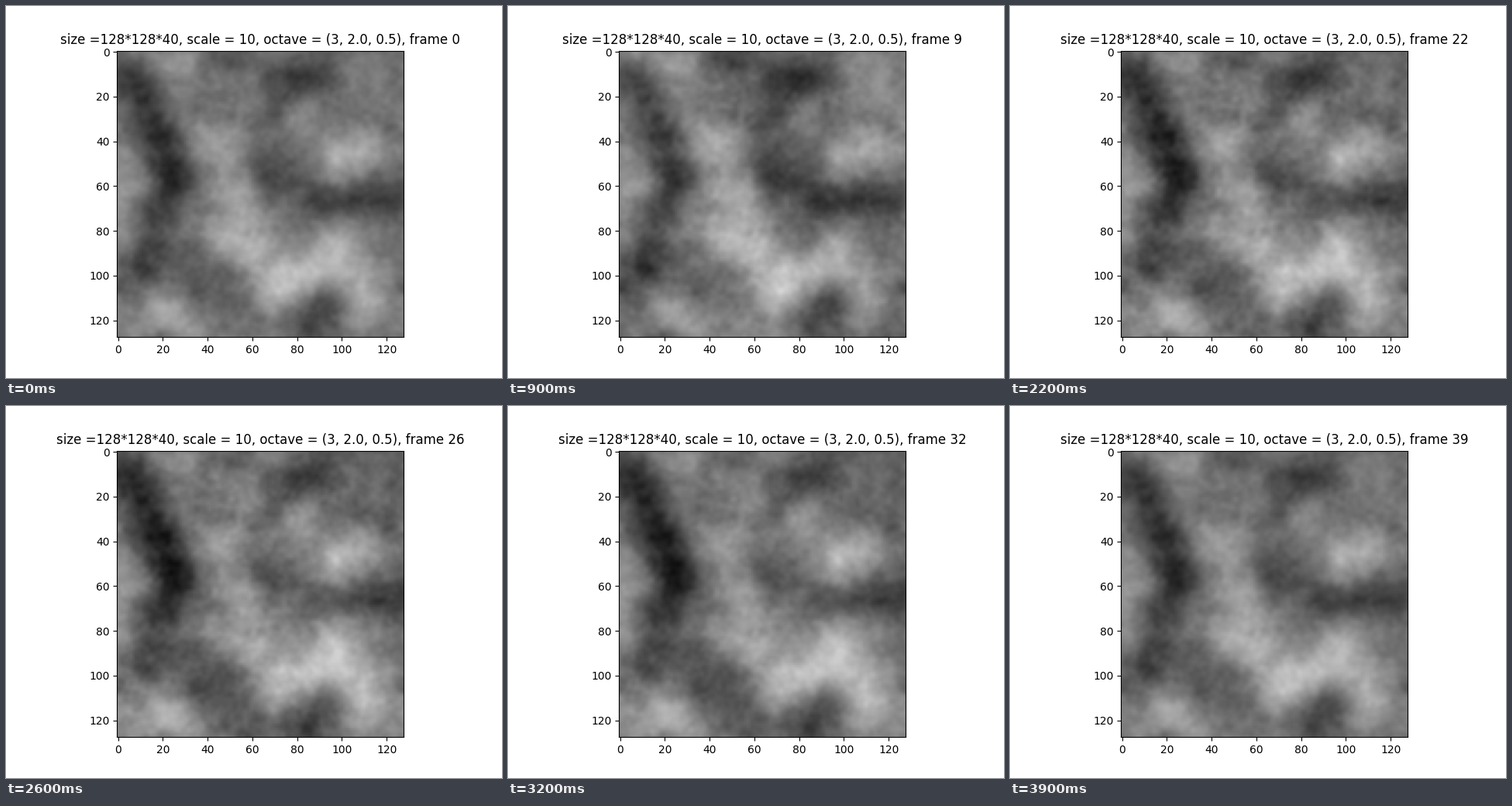
These frames come from a looping animation (640x480 px, 4000 ms). A matplotlib script:

```python
import numpy as np
import matplotlib.pyplot as plt
from matplotlib.animation import FuncAnimation

SIZE, FRAMES, INTERVAL = 128, 40, 100
MEAN, WIDTH = 0.46, 7

# Soft strokes: x0, y0, x1, y1, change in grey
DARK = [
    (6, 12, 26, 58, -.27), (17, 74, 13, 98, -.23), (34, 102, 50, 108, -.15),
    (48, 2, 52, 2, -.12), (74, 14, 90, 11, -.20), (68, 54, 76, 56, -.17),
    (90, 68, 126, 65, -.19), (84, 122, 92, 116, -.20),
]
BRIGHT = [
    (2, 52, 3, 78, .10), (20, 4, 30, 5, .15), (44, 44, 54, 62, .13),
    (50, 82, 62, 90, .23), (70, 106, 88, 97, .26), (98, 48, 108, 45, .24),
    (98, 84, 110, 114, .20), (20, 112, 32, 124, .19),
]

y, x = np.mgrid[:SIZE, :SIZE]
rng = np.random.default_rng(7)


def stroke(x0, y0, x1, y1, shade):
    """Gaussian falloff around a line segment."""
    dx, dy = x1 - x0, y1 - y0
    along = np.clip(((x - x0) * dx + (y - y0) * dy) / (dx ** 2 + dy ** 2), 0, 1)
    dist = np.hypot(x - x0 - along * dx, y - y0 - along * dy)
    return shade * np.exp(-0.5 * (dist / WIDTH) ** 2)


def grain(sigma):
    """Unit-variance random field blurred to the given width."""
    f = np.fft.fftfreq(SIZE)
    blur = np.exp(-2 * (np.pi * sigma) ** 2 * (f[:, None] ** 2 + f ** 2))
    field = np.fft.ifft2(np.fft.fft2(rng.standard_normal((SIZE, SIZE))) * blur).real
    return field / field.std()


def texture():
    return sum(0.024 * 0.75 ** k * grain(4 / 2 ** k) for k in range(3))


still = MEAN + sum(stroke(*s) for s in DARK + BRIGHT) + texture()
swing = -0.07 * np.cos(2 * np.pi * (x - y / 2 - 57) / 110) + 0.35 * texture()
drift = 0.35 * texture()


def clouds(i):
    t = 2 * np.pi * i / (FRAMES - 1)
    field = still + swing * np.sin(t) + drift * (np.cos(t) - 1)
    return np.clip(field, 0, 1)


def caption(i):
    return f"size =128*128*40, scale = 10, octave = (3, 2.0, 0.5), frame {i}"


fig, ax = plt.subplots(figsize=(6.4, 4.8), dpi=100)
image = ax.imshow(clouds(0), cmap="gray", vmin=0, vmax=1)
title = ax.set_title(caption(0))


def update(i):
    image.set_data(clouds(i))
    title.set_text(caption(i))
    return image, title


anim = FuncAnimation(fig, update, frames=FRAMES, interval=INTERVAL, repeat=True)
plt.show()
```
